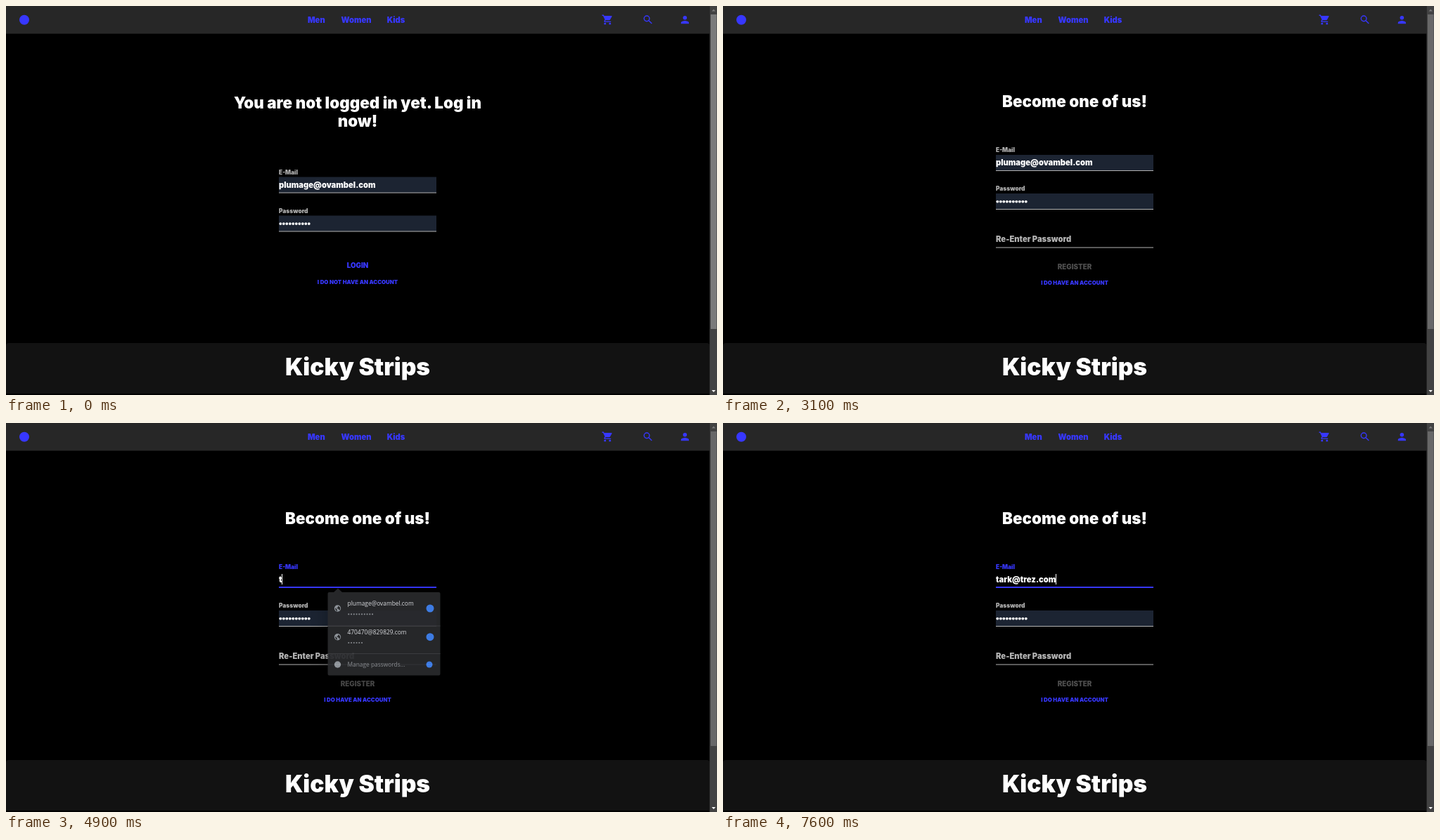
Recreate the animation shown at these times as an HTML page. Size 1011x554 px, loop 8000 ms.

```html
<!DOCTYPE html>
<html lang="en">
<head>
<meta charset="utf-8">
<title>Login form</title>
<style>
html, body { margin: 0; width: 100%; height: 100%; overflow: hidden; background: #000; }
svg { display: block; }
text { font-family: Inter, sans-serif; font-weight: 900; font-optical-sizing: none; fill: #fff; }
.blue { fill: #3737ff; }
.mid { text-anchor: middle; }
.h1 { font-size: 22.4px; }
.h3 { font-size: 33.6px; }
.body { font-size: 11.2px; }
.label { font-size: 8.4px; fill: #b3b3b3; }
.button { font-size: 9.8px; }
.small { font-size: 7.84px; }
#popup { filter: drop-shadow(0 6px 12px rgba(0, 0, 0, .35)); }
#popup text { font: 8.4px "Open Sans", sans-serif; fill: #e8eaed; }
#popup .dim { fill: #8f9296; }
</style>
</head>
<body>
<svg width="1011" height="554" viewBox="0 0 1011 554">
  <rect width="1000.5" height="39.5" fill="#272727"/>
  <g class="blue">
    <circle cx="26" cy="19.8" r="7"/>
    <text class="body mid blue" x="441.3" y="24">Men</text>
    <text class="body mid blue" x="498" y="24">Women</text>
    <text class="body mid blue" x="554.6" y="24">Kids</text>
    <g transform="translate(846.9 11.2) scale(.7)">
      <path d="M1 2v2h2l3.6 7.59-1.35 2.45C4.5 15.4 5.5 17 7 17h12v-2H7.42c-.2 0-.3-.2-.22-.37l.9-1.63h7.45c.75 0 1.41-.41 1.75-1.03l3.58-6.49C21.2 4.8 20.7 4 20 4H5.21l-.94-2z"/>
      <circle cx="7" cy="20" r="2"/><circle cx="17" cy="20" r="2"/>
    </g>
    <g transform="translate(904.5 11.2) scale(.7)" fill="none" stroke="#3737ff" stroke-width="2">
      <circle cx="9.5" cy="9.5" r="5.5"/><path d="M13.6 13.6l6.1 6.1"/>
    </g>
    <g transform="translate(957 11.2) scale(.7)">
      <circle cx="12" cy="8" r="4"/><path d="M12 14c-2.67 0-8 1.34-8 4v2h16v-2c0-2.66-5.33-4-8-4z"/>
    </g>
  </g>

  <path d="M0 552V484q0-4 4-4H996.5q4 0 4 4V552z" fill="#121212"/>
  <text class="h3 mid" x="500" y="526">Kicky Strips</text>

  <rect x="1000.5" width="10.5" height="554" fill="#424242"/>
  <rect id="thumb" x="1002" y="12" width="8.5" height="448"/>
  <path d="M1003.5 7.5l2.7-3 2.7 3z" fill="#7a7a7a"/>
  <path d="M1003.5 547l2.7 3 2.7-3z" fill="#fff"/>

  <g id="loginTitle">
    <text class="h1 mid" x="500" y="146.3">You are not logged in yet. Log in</text>
    <text class="h1 mid" x="500" y="172.4">now!</text>
  </g>
  <text id="registerTitle" class="h1 mid" x="500" y="144">Become one of us!</text>

  <g id="fields">
    <rect id="mailFill" x="388" y="243.5" width="224" height="22.5" fill="#1c2432"/>
    <text id="mailLabel" class="label" x="388" y="239.9">E-Mail</text>
    <text id="mail" class="body" x="388" y="258.6"></text>
    <rect id="mailLine" x="388" width="224"/>
    <rect id="focusLine" y="264.5" height="2" fill="#3737ff"/>
    <rect id="caret" y="246.5" width="1" height="15" fill="#fff"/>
    <rect x="388" y="298.5" width="224" height="22.5" fill="#1c2432"/>
    <text class="label" x="388" y="294.9">Password</text>
    <g id="dots" fill="#fff"></g>
    <rect id="passLine" x="388" width="224"/>
  </g>

  <g id="repeat">
    <text class="body" x="388" y="336.4" style="fill:#b3b3b3">Re-Enter Password</text>
    <rect x="388" y="343.5" width="224" height="1" fill="#b3b3b3"/>
  </g>
  <text id="submit" class="button mid" x="500"></text>
  <clipPath id="buttonBox"><rect id="buttonShape" x="388" width="224" height="22" rx="2.8"/></clipPath>
  <g clip-path="url(#buttonBox)">
    <rect id="hover" x="388" y="380" width="224" height="30" fill="#3737ff"/>
    <circle id="ripple" cx="475.5" cy="398" fill="#3737ff"/>
  </g>
  <text id="toggle" class="small mid blue" x="500"></text>

  <g id="popup">
    <path d="M466 241l6-5.5 6 5.5H615.5q2 0 2 2V357.5q0 2-2 2H459.5q-2 0-2-2V243q0-2 2-2z" fill="#292a2d"/>
    <path d="M457.5 289H617.5M457.5 328.5H617.5" stroke="#404144"/>
    <g id="accounts"></g>
    <circle cx="471.5" cy="344" r="4.7" fill="#9aa0a6"/>
    <text class="dim" x="485.5" y="347.3">Manage passwords...</text>
    <circle cx="602" cy="344" r="4.5" fill="#4285f4"/>
  </g>
</svg>
<script>
const LOOP = 8000;
const $ = id => document.getElementById(id);
const set = (id, attrs) => {
  for (const key in attrs) $(id).setAttribute(key, attrs[key]);
};
const show = (id, on) => set(id, { visibility: on ? 'visible' : 'hidden' });
const dotRow = (count, x, y, step, r) =>
  Array.from({ length: count }, (_, i) => `<circle cx="${x + i * step}" cy="${y}" r="${r}"/>`).join('');

// Value of the last [time, value] step that has begun.
const at = (steps, t) => steps.reduce((value, [start, next]) => t >= start ? next : value, steps[0][1]);

const SAVED = 'plumage@ovambel.com';
const TYPED = 'tark@trez.com';
const prefixes = steps => steps.map(([time, n]) => [time, TYPED.slice(0, n)]);
const typing = [[0, SAVED],
  ...prefixes([[4900, 1], [5000, 2], [5200, 3], [5300, 4], [5500, 5], [6000, 6], [6100, 7], [6300, 8], [6400, 9]]),
  [6500, TYPED.slice(0, 9) + '-'],
  ...prefixes([[7000, 9], [7200, 10], [7300, 11], [7500, 12], [7600, 13]])];
const hoverSteps = [[0, 0], [2000, .025], [2100, .07], [3100, 0]];
const rippleSize = [[0, 0], [2700, 21], [2800, 75], [2900, 121], [3100, 0]];
const rippleAlpha = [[0, .1], [2800, .08], [2900, .03]];
const submitColor = [[0, '#3737ff'], [2800, '#4242a0'], [2900, '#4d4d4d']];
const labelColor = [[0, '#b3b3b3'], [3900, '#8080cc'], [4000, '#5050ee'], [4100, '#3737ff']];
const focusScale = [[0, 0], [3900, .4], [4000, .9], [4100, 1]];
const popupAlpha = [[0, 0], [3900, .3], [4000, .8], [4100, 1], [4900, .93], [5000, .5], [5100, .15], [5200, 0]];
const mailGlow = [[0, 0], [3600, .6], [3700, 1], [3900, 0]];
const passGlow = [[0, 0], [3400, .6], [3500, 1], [3600, .4], [3700, 0]];

$('dots').innerHTML = dotRow(10, 390.3, 310.1, 4.5, 1.9);
$('accounts').innerHTML = [[SAVED, 264, 10], ['470470@829829.com', 304.7, 6]].map(([name, y, count]) => `
  <text x="485.5" y="${y - 4}">${name}</text>
  <g fill="#8f9296">${dotRow(count, 487.3, y + 8.3, 3.75, 1.1)}</g>
  <circle cx="471.5" cy="${y}" r="4.7" fill="#9aa0a6"/>
  <path d="M468 ${y - 1}l3 3v2q-3-1-3-5M472 ${y - 3.5}v2l-2 1 3 1.5 1 2q2-2 1-4.5z" fill="#292a2d"/>
  <circle cx="603" cy="${y}" r="5.5" fill="#4285f4"/>`).join('');

// An underline that brightens and thickens upwards while hovered.
function drawLine(id, bottom, glow) {
  const level = 179 + 76 * glow;
  set(id, { y: bottom - 1 - glow, height: 1 + glow, fill: `rgb(${level},${level},${level})` });
}

function draw(t) {
  const register = t >= 2700, typed = t >= 4900;
  set('thumb', { fill: t < 100 ? '#7b7b7b' : '#686868' });
  show('loginTitle', !register);
  show('registerTitle', register);
  show('repeat', register);
  set('fields', { transform: `translate(0 ${register ? -31.5 : 0})` });

  $('submit').textContent = register ? 'REGISTER' : 'LOGIN';
  set('submit', { y: register ? 374.5 : 372.5, style: `fill:${at(submitColor, t)}` });
  $('toggle').textContent = register ? 'I DO HAVE AN ACCOUNT' : 'I DO NOT HAVE AN ACCOUNT';
  set('toggle', { y: register ? 397.2 : 395.8 });
  set('buttonShape', { y: register ? 384 : 382 });
  set('hover', { opacity: at(hoverSteps, t) });
  set('ripple', { r: at(rippleSize, t), opacity: at(rippleAlpha, t) });

  $('mail').textContent = at(typing, t);
  show('mailFill', !typed);
  show('caret', typed);
  set('caret', { x: Math.round(388 + $('mail').getComputedTextLength() - .4) });
  set('mailLabel', { style: `fill:${at(labelColor, t)}` });
  const half = 112 * at(focusScale, t);
  set('focusLine', { x: 500 - half, width: 2 * half });
  drawLine('mailLine', 266.5, at(mailGlow, t));
  drawLine('passLine', 321.5, at(passGlow, t));
  set('popup', { opacity: at(popupAlpha, t) });
}

const begin = performance.now();
function tick() {
  draw(Math.floor((performance.now() - begin) % LOOP / 100) * 100);
  requestAnimationFrame(tick);
}
tick();
</script>
</body>
</html>
```
